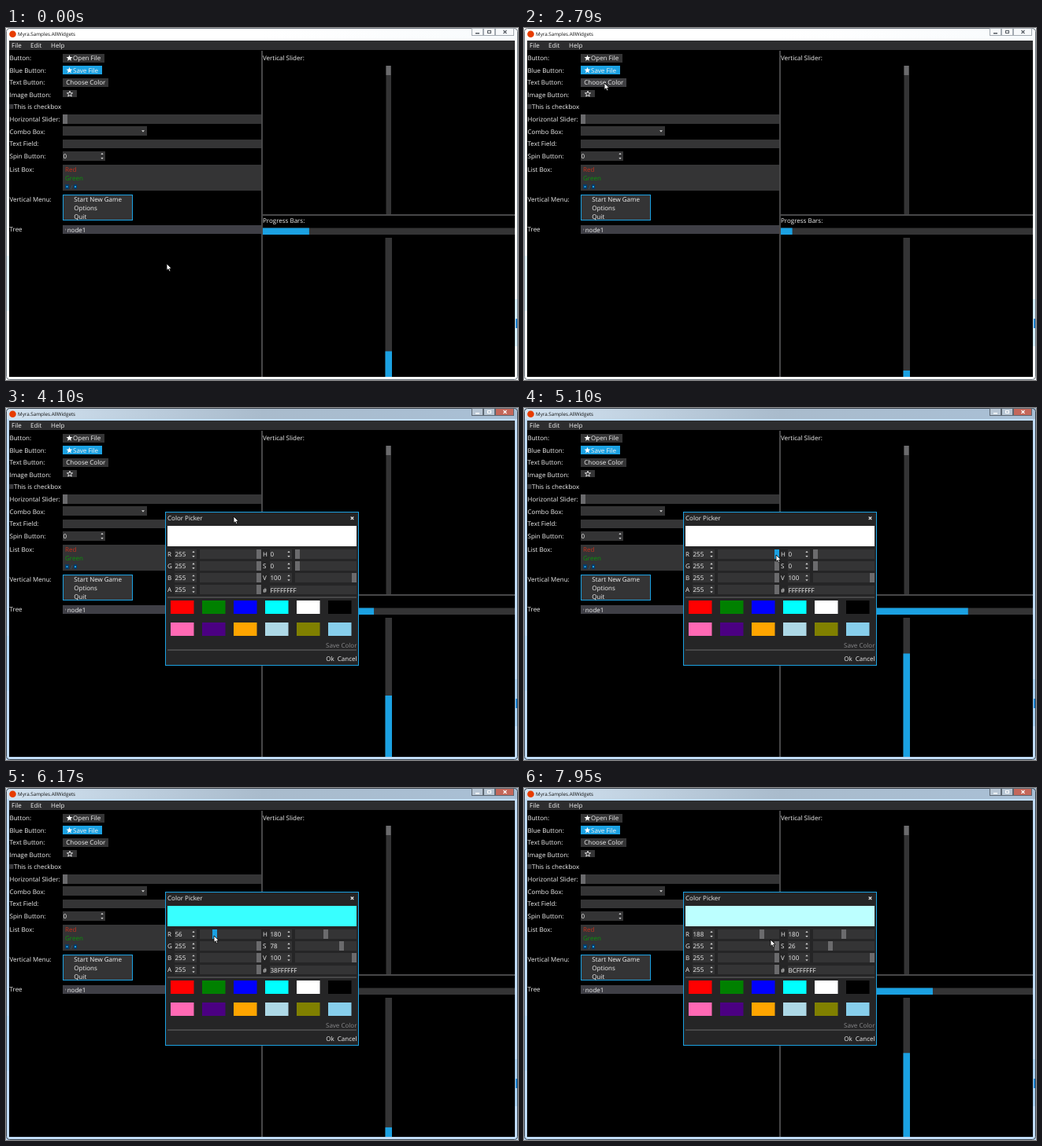
Write an HTML page with a canvas that moves like this. It is 650x448 px and loops after 8000 ms.

```html
<!DOCTYPE html>
<html lang="en">
<head>
<meta charset="utf-8">
<title>Widgets</title>
<style>
  html, body { margin: 0; width: 100%; height: 100%; overflow: hidden; background: #fff; }
  canvas { display: block; }
</style>
</head>
<body>
<canvas id="stage" width="650" height="448"></canvas>
<script>
const ctx = document.getElementById('stage').getContext('2d');
const LOOP = 8000, STEP = 77.2;
const PANEL = '#343435', GREY = '#6b6b6d', ACCENT = '#1ba1e2', LINE = '#474748', TEXT = '#f1f1f1';

// All times below count screen refreshes.
const OPEN = 40, DRAG_START = 66, DRAG_END = 100;
const progressKeys = [[0, .184], [21, .697], [103, 2.603]];
const redKeys = [[67, 255], [74, 181], [80, 56], [84, 12], [DRAG_END, 188]];
const cursorKeys = [[0, 204, 300], [11, 213, 85], [18, 100, 70], [21, 92, 69], [33, 102, 70], [45, 102, 70],
  [53, 289, 138], [DRAG_START, 320, 187], [DRAG_END, 302, 190], [103, 313, 193]];

function sample(keys, t) {
  const next = keys.findIndex(key => key[0] > t);
  if (next === 0) return keys[0].slice(1);
  if (next < 0) return keys.at(-1).slice(1);
  const a = keys[next - 1], b = keys[next];
  const k = (t - a[0]) / (b[0] - a[0]);
  return a.slice(1).map((v, i) => v + (b[i + 1] - v) * k);
}

function rect(x, y, w, h, fill) {
  ctx.fillStyle = fill;
  ctx.fillRect(x, y, w, h);
}

function frame(x, y, w, h, stroke) {
  ctx.strokeStyle = stroke;
  ctx.lineWidth = 1;
  ctx.strokeRect(x + .5, y + .5, w - 1, h - 1);
}

function text(s, x, y, fill = TEXT, size = 8) {
  ctx.font = `${size}px "Open Sans", "Noto Sans", sans-serif`;
  ctx.textRendering = 'geometricPrecision';
  ctx.fillStyle = fill;
  ctx.fillText(s, x, y);
}

function polygon(points, fill, stroke) {
  ctx.beginPath();
  points.forEach(([x, y]) => ctx.lineTo(x, y));
  ctx.closePath();
  if (fill) { ctx.fillStyle = fill; ctx.fill(); }
  if (stroke) { ctx.strokeStyle = stroke; ctx.lineWidth = .8; ctx.stroke(); }
}

function star(cx, cy, r, fill, stroke) {
  const points = Array.from({ length: 10 }, (_, i) => {
    const a = -Math.PI / 2 + i * Math.PI / 5, d = i % 2 ? r * .42 : r;
    return [cx + Math.cos(a) * d, cy + Math.sin(a) * d];
  });
  polygon(points, fill, stroke);
}

function triangle(x, y, dir, r = 1.7) {
  polygon([[x - r, y - dir * r / 2], [x + r, y - dir * r / 2], [x, y + dir * r * .7]], '#d8d8d8');
}

function cross(x, y, r, color) {
  ctx.strokeStyle = color;
  ctx.lineWidth = 1.1;
  ctx.beginPath();
  for (const d of [-r, r]) {
    ctx.moveTo(x - r, y - d);
    ctx.lineTo(x + r, y + d);
  }
  ctx.stroke();
}

function spinner(x, y, w, value) {
  rect(x, Math.round(y - 6), w, 12, PANEL);
  text(value, x + .5, y + 2.8);
  for (const dir of [-1, 1]) triangle(x + w - 4, y + dir * 2.8, dir);
}

function slider(x, y, w, ratio, hot) {
  rect(x, y, w, 12, PANEL);
  rect(x + Math.round((w - 6) * ratio), y, 6, 12, hot ? ACCENT : GREY);
}

function drawWindow(active) {
  rect(0, 0, 650, 448, active ? '#c0dcf6' : '#f8fbfd');
  const bar = ctx.createLinearGradient(0, 0, 650, 0);
  (active ? ['#d3e3f1', '#a9bbcc', '#a9c0d6'] : ['#fff', '#fff', '#f8fbfd'])
    .forEach((c, i) => bar.addColorStop(i / 2, c));
  rect(0, 0, 650, 14, bar);
  rect(0, 290, 4, 70, active ? '#b4d8f6' : '#e3f3fb');
  rect(646, 345, 4, 60, active ? '#a9d0f0' : '#d5eefa');
  rect(647, 370, 3, 12, '#1c82d0');
  ctx.strokeStyle = active ? '#39424c' : '#6c747c';
  ctx.lineWidth = 1;
  ctx.beginPath();
  ctx.roundRect(.5, .5, 649, 447, 4);
  ctx.stroke();

  ctx.fillStyle = '#e73c00';
  ctx.beginPath();
  ctx.arc(8.5, 7.7, 4.3, 0, 7);
  ctx.fill();
  text('Myra.Samples.AllWidgets', 15, 10.3, '#111', 6.25);

  const glass = active ? '#b8c6d4' : '#f7f9fb', mark = active ? '#fff' : '#555b62';
  for (const x of [591, 606, 621]) {
    const w = x === 621 ? 24 : 15;
    rect(x, 0, w, 10, active && x === 621 ? '#c4675a' : glass);
    frame(x, 0, w, 10, active ? '#5d6873' : '#a4abb2');
  }
  rect(596, 6, 5, 1.5, mark);
  frame(611, 3, 5, 4, mark);
  cross(633.5, 5, 2, mark);

  rect(4, 16, 642, 428, '#000');
  rect(4, 16, 642, 12, '#2d2d2f');
  text('File', 7, 24.5);
  text('Edit', 31, 24.5);
  text('Help', 57, 24.5);
}

function drawForm(hover) {
  const rowTop = i => Math.floor(33 + 15.5 * i);
  ['Button:', 'Blue Button:', 'Text Button:', 'Image Button:', '', 'Horizontal Slider:', 'Combo Box:', 'Text Field:',
    'Spin Button:'].forEach((label, i) => text(label, 4.5, 41 + 15.6 * i));
  ['List Box:', 'Vertical Menu:', 'Tree'].forEach((label, i) => text(label, 4.5, 183 + 38 * i));

  const button = (row, w, fill, label, x) => {
    rect(72, rowTop(row), w, 11, fill);
    text(label, x, 41 + 15.6 * row);
  };
  button(0, 53, PANEL, 'Open File', 85);
  button(1, 50, ACCENT, 'Save File', 85);
  button(2, 58, hover ? '#3f3f42' : PANEL, 'Choose Color', 76.3);
  star(80.5, 38.4, 4.2, '#fff');
  star(80.5, 54, 4.2, '#fff');
  rect(72, rowTop(3), 18, 9, PANEL);
  star(81, 84, 3.8, null, '#fff');

  rect(4.5, 97, 5, 6, '#3a3a3d');
  text('This is checkbox', 10, 103.2);
  slider(72, rowTop(5), 252, 0);
  rect(72, rowTop(6) - 1, 107, 12, PANEL);
  triangle(174, 131.2, 1, 2);
  rect(72, rowTop(7) + 1, 252, 11, PANEL);
  spinner(72, 163, 54, '0');

  rect(72, 174, 252, 33, PANEL);
  text('Red', 75, 183, '#c8301c');
  text('Green', 75, 194, '#0a960a');
  rect(75, 199, 5, 6, '#083a66');
  rect(76.5, 201, 2, 2, ACCENT);
  text('/', 82, 205, '#2a6390', 7);
  rect(86, 199, 4, 6, '#083a66');
  rect(87, 201, 2, 2, ACCENT);

  rect(72, 212, 89, 33, PANEL);
  frame(72, 212, 89, 33, ACCENT);
  ['Start New Game', 'Options', 'Quit'].forEach((item, i) => text(item, 86.3, 220.8 + 11.2 * i));
  rect(72, 251, 252, 11, '#3f3f46');
  polygon([[75, 255], [76.5, 256.5], [75, 258]], '#77777c');
  text('node1', 77.7, 259.5);
}

function drawMeters(progress) {
  rect(324, 29, 2, 415, LINE);
  rect(326, 237, 320, 2, LINE);
  text('Vertical Slider:', 326, 41);
  rect(482.5, 48, 6.5, 189, PANEL);
  rect(482.5, 48, 6, 12, GREY);
  text('Progress Bars:', 326, 247.5);
  rect(326, 254.5, 320, 8.5, PANEL);
  rect(326, 254.5, 320 * progress, 8.5, ACCENT);
  rect(481.5, 267, 8.5, 177, PANEL);
  rect(481.5, 444, 8.5, -177 * progress, ACCENT);
}

function drawDialog(red, dragging) {
  rect(202, 132, 246, 196, '#252526');
  frame(202, 132, 246, 196, ACCENT);
  text('Color Picker', 205, 143);
  cross(439.5, 140.3, 1.8, TEXT);
  rect(205, 150, 240, 26, `rgb(${red},255,255)`);

  const channel = (name, row, x, value, max, hot) => {
    const y = 186 + 15.1 * row;
    text(name, x, y + 2.8);
    spinner(x + 9, y, 28, String(value));
    slider(x + 41, Math.round(y - 6), 78, value / max, hot);
  };
  [red, 255, 255, 255].forEach((value, i) => channel('RGBA'[i], i, 205, value, 255, i === 0 && dragging));
  channel('H', 0, 326, red < 255 ? 180 : 0, 360);
  channel('S', 1, 326, Math.round((255 - red) / 2.55), 100);
  channel('V', 2, 326, 100, 100);
  text('#', 326, 234.5);
  rect(335, 226, 110, 11, PANEL);
  text(red.toString(16).toUpperCase().padStart(2, '0') + 'FFFFFF', 335.5, 234.5);

  rect(205, 240, 240, 2, LINE);
  ['red', 'green', 'blue', 'cyan', 'white', 'black', 'hotpink', 'indigo', 'orange', 'lightblue', 'olive', 'skyblue']
    .forEach((color, i) => rect(209 + i % 6 * 40, i < 6 ? 245 : 273, 29.5, 17, color));
  text('Save Color', 406, 304.7, '#8a8a8c');
  rect(205, 307, 240, 2, LINE);
  text('Ok', 406.2, 322);
  text('Cancel', 420.8, 322);
}

function drawCursor(x, y) {
  const shape = [[0, 0], [0, 8.4], [2, 6.7], [3.4, 9.8], [4.9, 9.2], [3.6, 6.2], [6.2, 6]];
  polygon(shape.map(([dx, dy]) => [x + dx, y + dy]), '#fff', '#000');
}

function render(n) {
  const open = n >= OPEN, dragging = n >= DRAG_START && n < DRAG_END;
  const red = Math.round(sample(redKeys, n)[0]);
  let [x, y] = sample(cursorKeys, n);
  if (dragging) x = 248.8 + red * .28;
  const hover = n < 47 && x < 130 && y < 75;
  drawWindow(open);
  drawForm(hover);
  drawMeters(sample(progressKeys, n)[0] % 1);
  if (open) drawDialog(red, dragging);
  drawCursor(Math.round(x), Math.round(y));
}

function tick() {
  const t = performance.now() % LOOP;
  render(Math.floor((t + 10) / STEP));
  requestAnimationFrame(tick);
}
tick();
</script>
</body>
</html>
```
